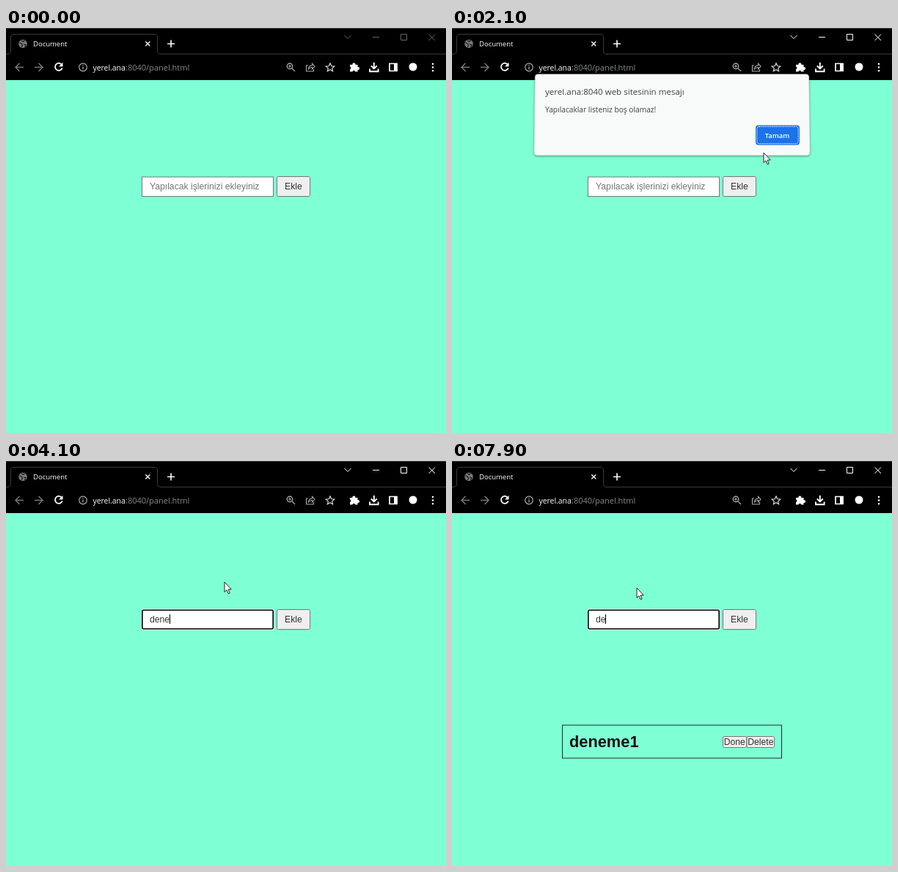
An HTML page that plays this animation: 600x552 px, repeating every 8 s.

```html
<!DOCTYPE html>
<html lang="tr">
<head>
<meta charset="utf-8">
<style>
html, body { margin: 0; width: 600px; height: 552px; overflow: hidden; background: #7fffd4 }
svg { display: block }
text { white-space: pre }
.ui { font-family: "Open Sans", "Noto Sans", sans-serif }
.page { font: 12.2px "Liberation Sans", Arial, sans-serif }
.line { fill: none; stroke: #fff }
.dim { stroke: #aaa }
.btn { fill: #efefef; stroke: #777 }
.label { fill: #333 }
</style>
</head>
<body>
<svg width="600" height="552" viewBox="0 0 600 552">
  <rect width="600" height="552" fill="#7fffd4"/>

  <g class="ui">
    <rect width="600" height="71"/>
    <path d="M0 .5H600M0 35.5H2Q6.500 35.500 6.500 31V13Q6.500 8.500 11 8.500H202Q206.500 8.500 206.500 13V31Q206.500 35.500 211 35.500H600" fill="none" stroke="#3a3a3a"/>
    <circle cx="23" cy="21.500" r="5.800" fill="#75797d"/>
    <path d="M18.500 20l3 1.500 1 2.500-1.500 2M21 17l2.500 1.500 2-1.500M24 22l3 1-1.500 3" fill="none" stroke="#151515" stroke-width="1.100"/>
    <text x="37" y="25" font-size="9.500" font-weight="500" fill="#fff">Document</text>
    <path class="line" stroke-width="1.300" d="M190.300 18.500l6 6m0-6l-6 6"/>
    <path class="line" stroke-width="1.600" d="M220 21.500h10M225 16.500v10"/>
    <path id="controls" fill="none" d="M461.500 10l4.500 4.500 4.500-4.500M500 12.500h9M538.500 8.500h8v8h-8zM576.500 8.500l8.500 8.500m0-8.500l-8.500 8.500"/>

    <g class="line" stroke-width="1.500">
      <path stroke="#777" d="M24 53.500H13m5.500-5.500L13 53.500l5.500 5.500M39 53.500h11m-5.500-5.500l5.500 5.500-5.500 5.500"/>
      <path stroke-width="1.800" d="M76 50a5 5 0 1 0 .700 4.500"/>
    </g>
    <path d="M77.500 47v5.500H72z" fill="#fff"/>
    <circle class="line dim" cx="105" cy="53.500" r="5.300" stroke-width="1.200"/>
    <path class="line dim" d="M105 52.500v4M105 50v1.300" stroke-width="1.300"/>
    <text x="118.500" y="57.500" font-size="10.400" font-weight="500" fill="#fff">yerel.ana</text>
    <text x="163" y="57.500" font-size="11" fill="#85898d">:8040/panel.html</text>

    <g class="line dim" stroke-width="1.400">
      <circle cx="387" cy="52" r="3.700"/>
      <path d="M390 55l4 4M385 52h4m-2-2v4" stroke-width="1.200"/>
      <path d="M412 51h-2.500v8h10v-3M412.500 56q.500-5 5-5v-2.500l3.500 3.800-3.500 3.700v-2.500q-3 0-5 2.500z" stroke-width="1.100"/>
      <path stroke="#ddd" stroke-width="1.200" d="M442 48l1.700 3.800 4.100.400-3.100 2.700.900 4-3.600-2.100-3.600 2.100.900-4-3.100-2.700 4.100-.400z"/>
    </g>
    <path fill="#fff" d="M469 50h3.500a2 2 0 1 1 3.800 0h3.200v3.200a2 2 0 1 1 0 3.800v2.500h-3.300a2 2 0 0 0-3.800 0H469v-3.300a2 2 0 0 0 0-3.800z"/>
    <path class="line" stroke-width="1.900" d="M501.800 47v8m-4-3.500l4 4 4-4M496 55.500v3.800h11.600v-3.800"/>
    <path class="line" stroke-width="1.700" d="M523 48.500h10v10h-10z"/>
    <path d="M529 48h4.500v11H529z" fill="#fff"/>
    <circle cx="555" cy="53" r="5.500" fill="#fff"/>
    <path class="line" stroke-width="2.600" stroke-linecap="round" d="M582 49h.010M582 53.600h.010M582 58.200h.010"/>
  </g>

  <g class="page">
    <rect id="ring" x="184.500" y="201.500" width="181" height="29" rx="2.500" fill="#fff"/>
    <rect id="field" fill="#fff"/>
    <text id="value" x="196" y="220"></text>
    <path id="caret" stroke="#000"/>
    <rect class="btn" x="369.500" y="202.500" width="45" height="27" rx="2"/>
    <text class="label" x="380" y="220">Ekle</text>
    <g id="item">
      <rect x="150.500" y="360" width="299" height="45" fill="none" stroke="#000" stroke-width=".8"/>
      <text x="160" y="389.500" font-size="21.800" font-weight="bold" fill="#111">deneme1</text>
      <rect class="btn" x="369.500" y="375.500" width="32" height="15" rx="2"/>
      <rect class="btn" x="402" y="375.500" width="37.500" height="15" rx="2"/>
      <text class="label" x="370.700" y="387">Done</text>
      <text class="label" x="403.200" y="387">Delete</text>
    </g>
  </g>

  <g id="dialog" class="ui" style="filter: drop-shadow(0 1px 1.500px #0006)">
    <path id="sheet" fill="#f8fafa" stroke="#ccd5d5" stroke-width=".6"/>
    <text x="127" y="91" font-size="11.550" fill="#3c4043">yerel.ana:8040 web sitesinin mesajı</text>
    <text x="127" y="115" font-size="10.200" fill="#3c4043">Yapılacaklar listeniz boş olamaz!</text>
    <rect x="414" y="132.500" width="60" height="27" rx="4" fill="#1a73e8"/>
    <rect id="focus" class="line" x="415.800" y="134.300" width="56.400" height="23.400" rx="3" stroke-dasharray="1.500 1"/>
    <text x="443.500" y="149.500" font-size="9.400" font-weight="600" fill="#fff" text-anchor="middle">Tamam</text>
  </g>

  <path id="cursor" stroke-linejoin="round"/>
</svg>
<script>
const $ = id => document.getElementById(id);
const set = (id, attrs) => { for (const k in attrs) $(id).setAttribute(k, attrs[k]); };
const show = (id, on) => { $(id).style.display = on ? '' : 'none'; };
const clamp = v => Math.max(0, Math.min(1, v));

const shapes = {
  arrow: 'M0 0V13.500L3 10.800 5.200 15.800 7.200 15 5 10H9.300Z',
  hand: 'M-1.500 10V1.300A1.400 1.400 0 0 1 1.300 1.300V6.500L6.500 7.600Q8.500 8.300 8.200 11L7 19H0L-5.500 12Q-6 9-3.500 10L-1.500 12Z',
  beam: 'M-3-6.500Q0-6.500 0-5Q0-6.500 3-6.500M0-5V5M-3 6.500Q0 6.500 0 5Q0 6.500 3 6.500'
};

// time, x, y, shape
const path = [
  [1200, 590, 95, 'arrow'], [1300, 470, 180, 'arrow'], [1400, 397, 211, 'hand'],
  [2000, 397, 211, 'hand'], [2100, 425, 170, 'arrow'], [2200, 440, 147, 'arrow'],
  [2300, 415, 152, 'arrow'], [2400, 323, 172, 'arrow'], [2600, 295, 198, 'arrow'],
  [2700, 288, 213, 'beam'], [2900, 284, 219, 'beam'], [3200, 284, 219, 'beam'],
  [3300, 325, 212, 'beam'], [3400, 355, 190, 'arrow'], [3600, 320, 170, 'arrow'],
  [3800, 298, 165, 'arrow'], [5900, 298, 165, 'arrow'], [6000, 312, 151, 'arrow'],
  [6200, 375, 220, 'arrow'], [6300, 388, 211, 'hand'], [6600, 388, 211, 'hand'],
  [6800, 355, 214, 'beam'], [7000, 285, 217, 'beam'], [7200, 280, 215, 'beam'],
  [7300, 270, 195, 'arrow'], [7600, 252, 174, 'arrow'], [7700, 252, 173, 'arrow'],
  [8000, 252, 173, 'arrow']
];

// time, field text; null means the field has no focus
const typing = [
  [0, null], [3100, ''], [3800, 'd'], [3900, 'de'], [4000, 'den'], [4100, 'dene'],
  [4200, 'denem'], [4300, 'deneme'], [5400, 'deneme1'], [6400, null],
  [7100, ''], [7600, 'd'], [7900, 'de']
];

function drawField(t) {
  const [since, typed] = typing.findLast(e => e[0] <= t);
  const focused = typed !== null;
  show('ring', focused);
  set('field', focused
    ? { x: 185.8, y: 203.3, width: 178.4, height: 25.4, rx: 1.5, stroke: '#000', 'stroke-width': 1.6 }
    : { x: 185.5, y: 203, width: 179, height: 26.5, rx: 0, stroke: '#767676', 'stroke-width': 1 });
  const value = $('value');
  value.textContent = typed || 'Yapılacak işlerinizi ekleyiniz';
  set('value', { fill: typed ? '#333' : '#757575' });
  const end = typed ? Math.floor(value.getComputedTextLength()) : 0;
  set('caret', { d: `M${196.5 + end} 209v13` });
  show('caret', focused && (t - since) % 1000 < 500);
}

function drawDialog(t) {
  const open = clamp((t - 1300) / 200), close = clamp((t - 2300) / 330);
  const lift = 12 * Math.max(1 - open, Math.min(1, close * 1.3));
  const s = 0.8 + 3 * close;
  set('sheet', { d: `M${116.5 + s} 63H${483.5 - s}q4 0 4 4L488 169.500q0 4-4 4H116q-4 0-4-4L${112.5 + s} 67q0-4 4-4Z` });
  set('dialog', { transform: `translate(0 ${-lift})`, opacity: open * (1 - close) });
  show('dialog', t > 1300 && close < 1);
  show('focus', t < 2200);
}

function drawCursor(t) {
  show('cursor', t >= path[0][0]);
  if (t < path[0][0]) return;
  const i = path.findLastIndex(p => p[0] <= t);
  const a = path[i], b = path[i + 1];
  const k = (t - a[0]) / (b[0] - a[0]);
  const mix = n => a[n] + (b[n] - a[n]) * k;
  const beam = a[3] === 'beam';
  set('cursor', {
    d: shapes[a[3]],
    transform: `translate(${mix(1)} ${mix(2)})`,
    fill: beam ? 'none' : '#fff',
    stroke: beam ? '#444' : '#222'
  });
}

function frame(now) {
  const t = Math.floor(now % 8000 / 100) * 100;
  set('controls', { stroke: t < 1300 ? '#666' : '#fff' });
  show('item', t >= 6400);
  drawField(t);
  drawDialog(t);
  drawCursor(t);
  requestAnimationFrame(frame);
}
frame(performance.now());
</script>
</body>
</html>
```
